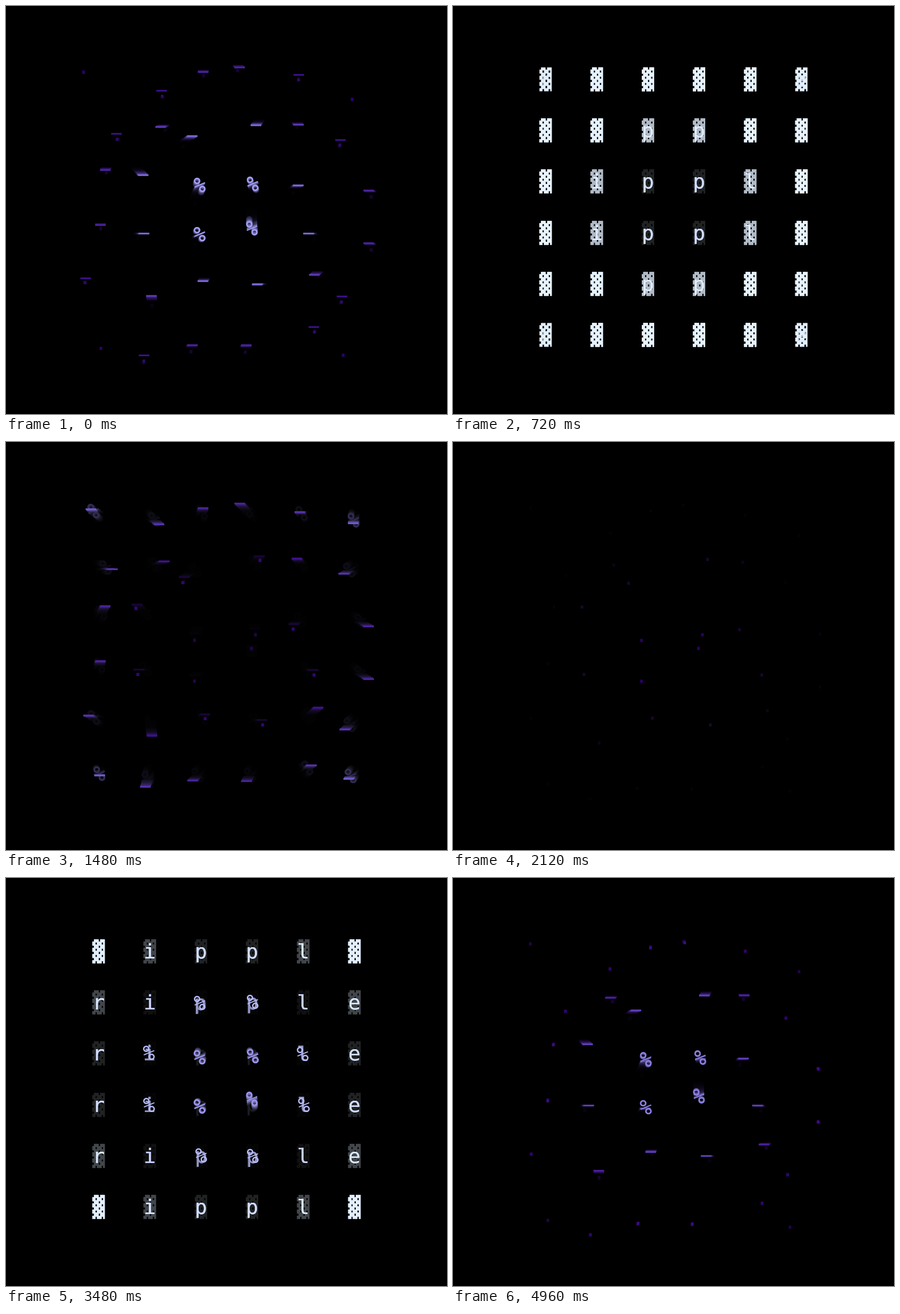
An HTML page with a canvas for the animation above (5 s loop, 778 by 720 pixels).

```html
<!DOCTYPE html>
<html lang="en">
<head>
<meta charset="utf-8">
<title>Ripple</title>
<style>
  html, body { margin: 0; width: 100%; height: 100%; overflow: hidden; background: #000; }
  canvas { display: block; }
</style>
</head>
<body>
<canvas id="stage" width="778" height="720"></canvas>
<script>
const ctx = document.getElementById('stage').getContext('2d');
const LOOP = 5000, FRAME = 40;
const TRAIL_STEP = 1000 / 60, TRAIL_LENGTH = 22, TRAIL_FADE = 0.22;
const WORD = 'ripple', SIZE = WORD.length, GAP = 90.25;

// Where each cell drifts to at the bottom of the wave, row by row
const DRIFT = [
  [[-27, -23], [24, 22], [5, -18], [-28, -28], [-9, -10], [-4, 26]],
  [[36, 6], [30, -12], [-34, 20], [15, -22], [-13, -17], [-28, 18]],
  [[15, -28], [-26, -28], [-11.5, 31], [6, 21], [-19, 11.5], [32.5, 18.5]],
  [[4, -19], [-22.5, 0], [-11.5, 12.5], [-1, -46], [20.5, 1], [32.5, 22]],
  [[-26, -13], [4.5, 31], [8, -13], [20, -1], [30.5, -26], [-25, 24]],
  [[4, 14], [-11.5, 40], [-19, 21], [-13, 22], [21.5, -17], [-20, 26]]
];

// Colour along the wave, from crest (0) to trough (1)
const STOPS = [
  [0, 232, 244, 255], [0.06, 218, 232, 255], [0.15, 198, 206, 255],
  [0.3, 168, 164, 250], [0.44, 126, 110, 216], [0.56, 90, 54, 176],
  [0.7, 60, 16, 136], [0.81, 42, 0, 100], [0.93, 24, 8, 40], [1, 3, 2, 8]
];

const cells = DRIFT.flatMap((row, r) => row.map(([dx, dy], c) => ({
  x: 389 + (c - 2.5) * GAP,
  y: 367.6 + (r - 2.5) * GAP,
  dx, dy,
  letter: WORD[c],
  distance: Math.hypot(c - 2.5, r - 2.5)
})));

function smoothstep(from, to, x) {
  const p = Math.min(1, Math.max(0, (x - from) / (to - from)));
  return p * p * (3 - 2 * p);
}

function depthAt(time, distance) {
  const phase = 0.0025 * (time - 367 - 135 * distance);
  const skew = 0.045 * (1 - Math.cos(phase)) ** 2;
  return (1 - Math.cos(phase - skew)) / 2;
}

function colorAt(depth) {
  const i = Math.max(1, STOPS.findIndex(stop => depth <= stop[0]));
  const a = STOPS[i - 1], b = STOPS[i];
  const p = (depth - a[0]) / (b[0] - a[0]);
  const channel = n => Math.round(a[n] + (b[n] - a[n]) * p);
  return `rgb(${channel(1)},${channel(2)},${channel(3)})`;
}

function glyphAt(depth, letter) {
  if (depth < 0.027) return '\u2593';
  if (depth < 0.203) return letter;
  if (depth < 0.426) return '%';
  if (depth < 0.711) return '\u2212';
  return '.';
}

function drawCells(time) {
  for (const cell of cells) {
    const depth = depthAt(time, cell.distance);
    const shift = smoothstep(0.1, 0.87, depth);
    ctx.fillStyle = colorAt(depth);
    ctx.fillText(glyphAt(depth, cell.letter),
      cell.x + cell.dx * shift, cell.y + cell.dy * shift);
  }
}

// The trail is rebuilt from earlier moments, so a picture depends on its time alone
function render(time) {
  ctx.fillStyle = '#000';
  ctx.fillRect(0, 0, 778, 720);
  ctx.font = '36px "DejaVu Sans Mono", monospace';
  ctx.textAlign = 'center';
  ctx.textBaseline = 'alphabetic';
  for (let k = TRAIL_LENGTH; k >= 0; k--) {
    ctx.fillStyle = `rgba(0,0,0,${TRAIL_FADE})`;
    ctx.fillRect(0, 0, 778, 720);
    drawCells(time - k * TRAIL_STEP);
  }
}

let start = null, shown = -1;
function tick(now) {
  if (start === null) start = now;
  const time = Math.floor(((now - start) % LOOP) / FRAME) * FRAME;
  if (time !== shown) {
    shown = time;
    render(time);
  }
  requestAnimationFrame(tick);
}
render(0);
requestAnimationFrame(tick);
</script>
</body>
</html>
```
